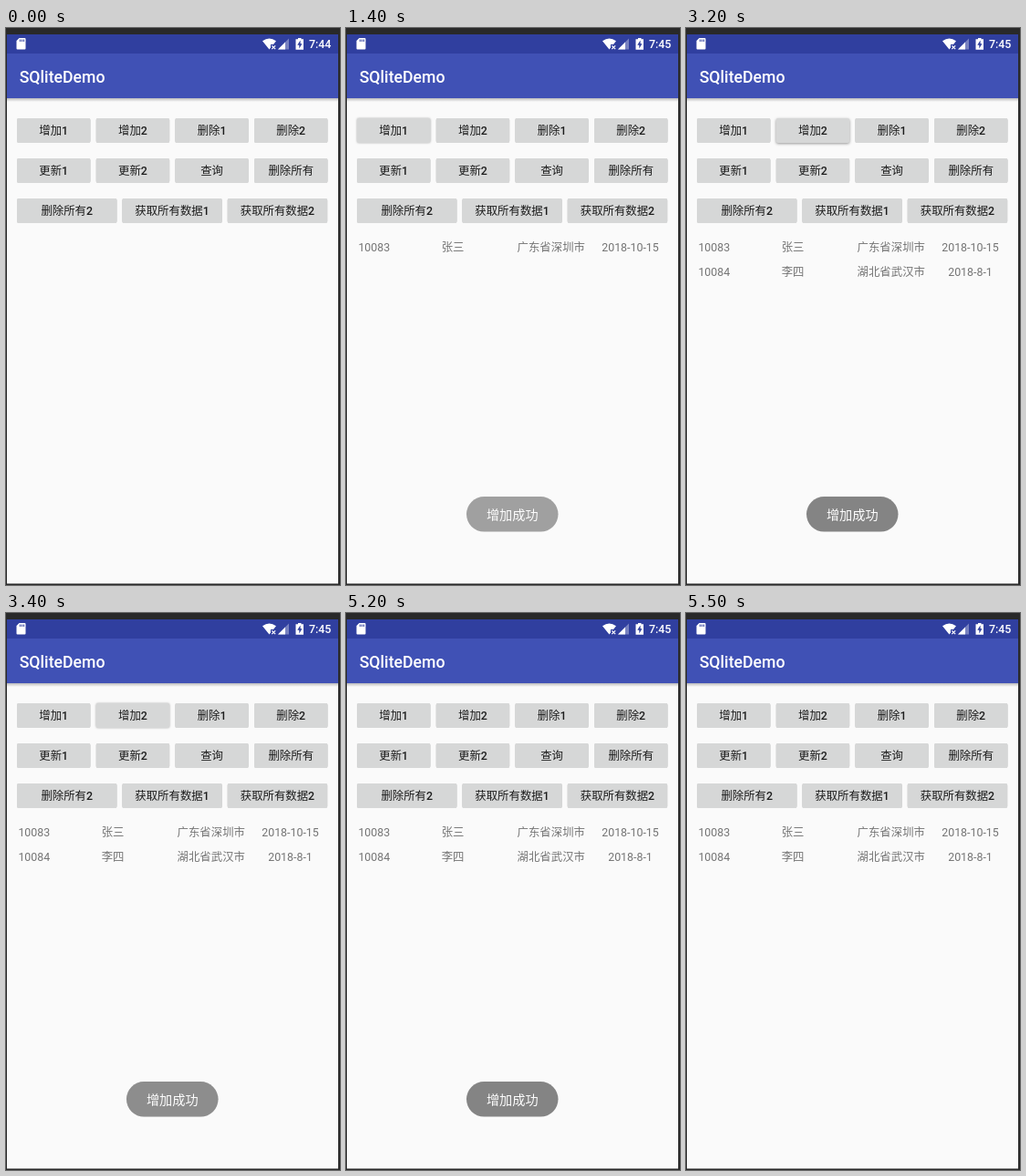
An HTML page for the animation above (8000 ms loop, 366 px wide and 611 px high).

```html
<!DOCTYPE html>
<html lang="zh-CN">
<meta charset="utf-8">
<title>SQliteDemo</title>
<style>
  html, body { margin: 0; width: 100%; height: 100%; overflow: hidden; background: #fafafa; }
  svg { display: block; width: 100%; height: 100%; }
  text { font: 12.4px Roboto, "Noto Sans CJK SC", "Noto Sans CJK", sans-serif; fill: #747474; }
  .mid { text-anchor: middle; }
  .btn text { font-weight: 500; fill: #1c1c1c; }
  .bar { font-weight: 500; fill: #fff; }
  .title { font-size: 17.7px; }
  .toast text { font-size: 14.2px; fill: #fff; }
</style>
<svg viewBox="0 0 366 611">
  <defs>
    <linearGradient id="shade" x2="0" y2="1">
      <stop stop-color="#000" stop-opacity=".25"/>
      <stop offset="1" stop-color="#000" stop-opacity="0"/>
    </linearGradient>
  </defs>
  <rect width="366" height="611" fill="#fafafa"/>
  <rect y="77" width="366" height="4" fill="url(#shade)"/>
  <rect y="28" width="366" height="49" fill="#4051b5"/>
  <rect y="7" width="366" height="21" fill="#303f9f"/>
  <path d="M0 0H366V611H0ZM1 7V609.5H364V7Z" fill="#292929" fill-rule="evenodd"/>

  <g fill="#fff">
    <path d="M14.5 11H20.5Q21.5 11 21.5 12V22.5Q21.5 23.5 20.5 23.5H12.5Q11.5 23.5 11.5 22.5V14Z"/>
    <path d="M15.5 12.5V15M17.5 12.5V15M19.5 12.5V15" stroke="#303f9f"/>
    <path d="M281 14.3Q288.5 8.5 296 14.3L293 18H290V21.6L288.5 23.4Z"/>
    <path d="M291.3 19.3L295.2 23.2M295.2 19.3L291.3 23.2" stroke="#fff" stroke-width="1.2"/>
    <path d="M298 23.5L310 11.5V23.5Z" opacity=".35"/>
    <path d="M298 23.5L306 15.5V23.5Z"/>
    <path d="M317.5 12.3H320V11H323.5V12.3H326V23.7H317.5Z"/>
    <path d="M322.6 13.6L319.2 18.7H321.3V22.4L324.5 17.3H322.6Z" fill="#303f9f"/>
  </g>
  <text id="clock" class="bar" x="332" y="22.3"></text>
  <text class="bar title" x="14.7" y="59.5">SQliteDemo</text>
  <g id="ui"></g>
</svg>
<script>
const ui = document.getElementById('ui'), clock = document.getElementById('clock');
const CLICKS = [1200, 3200], FADE = 500, HOLD = 1800;

function add(markup) {
  ui.insertAdjacentHTML('beforeend', markup);
  return ui.lastElementChild;
}

const buttons = [];
function buttonRow(y, xs, width, labels) {
  labels.forEach((label, i) => buttons.push(add(`<g class="btn">
    <rect x="${xs[i]}" y="${y}" width="${width}" height="27" rx="2" fill="#d6d7d7"/>
    <text class="mid" x="${xs[i] + width / 2}" y="${y + 18}">${label}</text></g>`)));
}
const quarter = [12, 98.7, 185.3, 272];
buttonRow(99, quarter, 80.5, ['增加1', '增加2', '删除1', '删除2']);
buttonRow(143, quarter, 80.5, ['更新1', '更新2', '查询', '删除所有']);
buttonRow(187, [12, 127.3, 242.7], 109.5, ['删除所有2', '获取所有数据1', '获取所有数据2']);

const records = [
  ['10083', '张三', '广东省深圳市', '2018-10-15'],
  ['10084', '李四', '湖北省武汉市', '2018-8-1']
].map(([id, name, place, date], i) => {
  const y = 245 + i * 26.6;
  return add(`<g><text x="13.4" y="${y}">${id}</text><text x="104.7" y="${y}">${name}</text>
    <text x="187.6" y="${y}">${place}</text><text class="mid" x="311.5" y="${y}">${date}</text></g>`);
});

const toasts = CLICKS.map(() => add(`<g class="toast">
  <rect x="132" y="514" width="100.5" height="38.6" rx="19.3" fill="#6e6e6e"/>
  <text class="mid" x="182.3" y="539">增加成功</text></g>`));

const clamp = v => Math.min(1, Math.max(0, v));

// Decelerating fade in, accelerating fade out
function toastAlpha(age) {
  const enter = clamp(age / FADE), leave = clamp((age - HOLD) / FADE);
  return (1 - (1 - enter) ** 2) * (1 - leave ** 2);
}

const lift = age => age < 0 ? clamp(1 + age / 200) : clamp(1 - age / 400);

function shadow(raise) {
  return `drop-shadow(0 ${0.4 + raise}px ${0.5 + raise * 1.2}px rgba(0,0,0,${0.2 + raise * 0.2}))`;
}
buttons.forEach(b => b.style.filter = shadow(0));

function draw(now) {
  let t = Math.floor(now % 8000 / 100) * 100;
  clock.textContent = t < 100 ? '7:44' : '7:45';
  // The screen holds still until the next redraw
  if (t < 1100) t = 0;
  else if (t > 1700 && t < 3200) t = 1700;
  else if (t > 3700 && t < 5200) t = 3700;
  CLICKS.forEach((click, i) => {
    const age = t - click;
    buttons[i].style.filter = shadow(lift(age));
    records[i].style.display = age < 0 ? 'none' : '';
    toasts[i].style.opacity = toastAlpha(age);
  });
}

let start;
function tick(now) {
  start ??= now;
  draw(now - start);
  requestAnimationFrame(tick);
}
draw(0);
requestAnimationFrame(tick);
</script>
</html>
```
